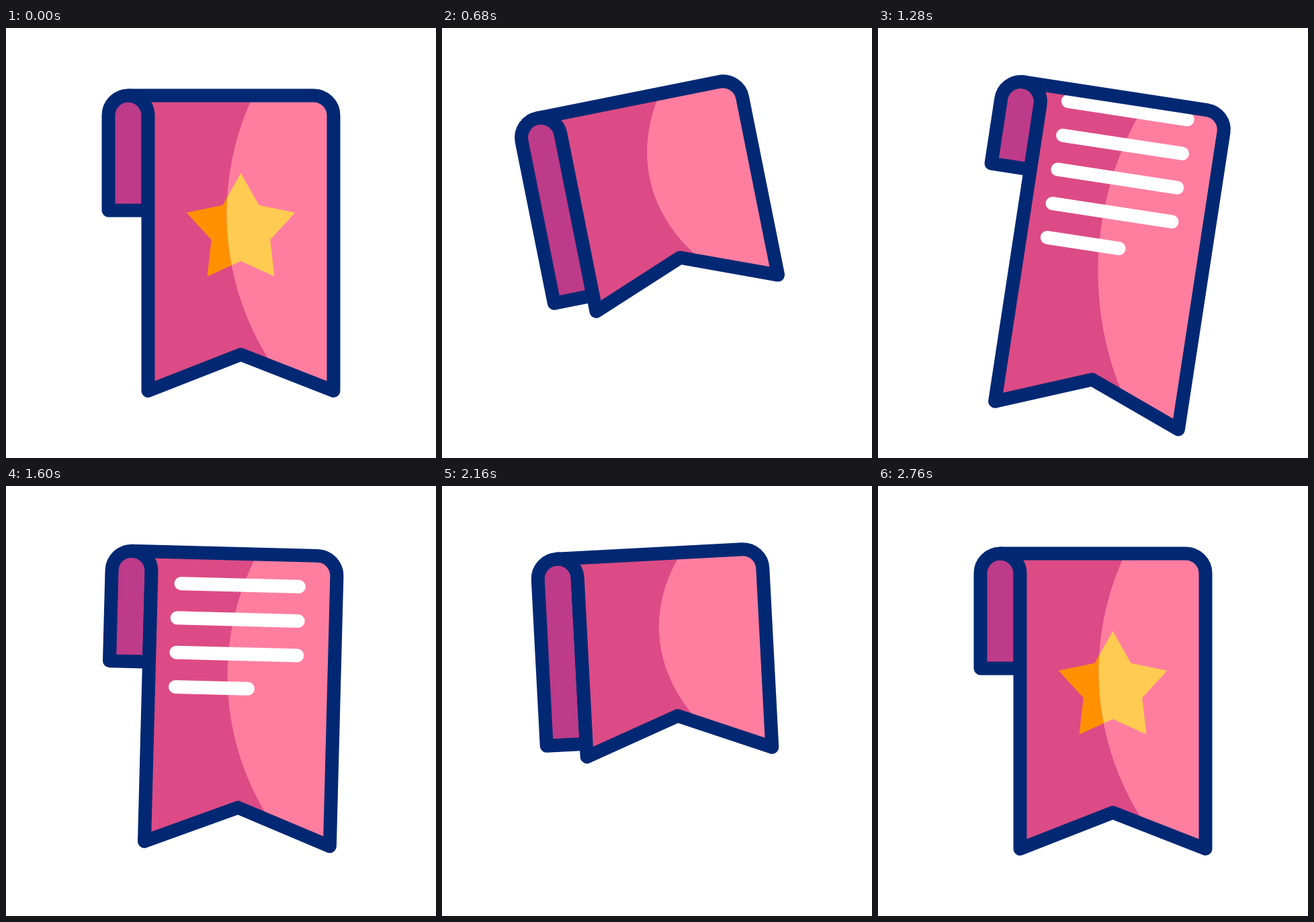
An HTML page with a canvas that plays this animation: 640 px wide and 640 px high, repeating every 3000 ms.

```html
<!DOCTYPE html>
<html lang="en">
<head>
<meta charset="utf-8">
<title>Bookmark</title>
<style>
  html, body { margin: 0; width: 100%; height: 100%; overflow: hidden; background: #fff; }
  canvas { display: block; }
</style>
</head>
<body>
<canvas width="640" height="640"></canvas>
<script>
const ctx = document.querySelector('canvas').getContext('2d');
const LOOP = 3000, STEP = 40, START = 200, BEAT = 560;
const NAVY = '#022873', PINK = '#dc4b85', LIGHT = '#ff7ea0', PURPLE = '#bd3b88',
      ORANGE = '#ff9100', YELLOW = '#ffcb51';

// cubic-bezier(1/3, 0, landing, 1)
function ease(u, landing = 2 / 3) {
  let lo = 0, hi = 1;
  for (let i = 0; i < 24; i++) {
    const s = (lo + hi) / 2, r = 1 - s;
    if (r * r * s + 3 * r * s * s * landing + s ** 3 < u) lo = s; else hi = s;
  }
  return lo * lo * (3 - 2 * lo);
}

// Eased progress from 0 to 1 between two times
function ramp(t, from, to, landing) {
  return ease(Math.min(1, Math.max(0, (t - from) / (to - from))), landing);
}

function poseAt(t) {
  const beat = i => ramp(t, START + BEAT * i, START + BEAT * (i + 1));
  const rollUp = ramp(t, 200, 760, .37);
  const unroll = beat(1);
  const rollBack = ramp(t, 1320, 2160);
  const settle = ramp(t, 2160, 2760, .07);
  const rolled = rollUp - settle, extended = unroll - rollBack;
  return {
    angle: -12 * beat(0) + 21 * beat(1) - 15 * beat(2) + 6 * beat(3),
    body: -143 * rolled + 182.5 * extended,
    flap: 106 * rolled - 152 * extended,
    star: -290 * rollUp - 50 * rollBack + 340 * settle,
    text: 61 + 267 * unroll - 104 * rollBack
  };
}

function fill(path, color) {
  ctx.fillStyle = color;
  ctx.fill(path);
}

function outline(path) {
  ctx.strokeStyle = NAVY;
  ctx.stroke(path);
}

function starPath(cx, cy) {
  const path = new Path2D();
  for (let i = 0; i < 10; i++) {
    const a = i * Math.PI / 5, r = i % 2 ? 46 : 85;
    path.lineTo(cx + r * Math.sin(a), cy - r * Math.cos(a));
  }
  path.closePath();
  return path;
}

// Five lines, wiped away from the left one after another
function drawText(t, bottom) {
  ctx.strokeStyle = '#fff';
  for (let i = 0; i < 5; i++) {
    const start = 1490 + 80 * i, wipe = ramp(t, start, start + 320);
    if (t >= start + 320) continue;
    const left = 251.5, length = i < 4 ? 180 : 108, y = bottom - 51.3 * (4 - i);
    ctx.beginPath();
    ctx.moveTo(left + length * wipe, y);
    ctx.lineTo(left + length, y);
    ctx.stroke();
  }
}

function draw(t) {
  const pose = poseAt(t);
  const tip = 540 + pose.body, stretch = (tip - 100) / 440;

  const flap = new Path2D(`M211.5 ${271.5 + pose.flap}H152.5V130A29.5 29.5 0 0 1 211.5 130Z`);
  const body = new Path2D(`M182 100.5H458A29.5 29.5 0 0 1 487.5 130V${tip}
    L349.5 ${tip - 54}L211.5 ${tip}V130A29.5 29.5 0 0 0 182 100.5Z`);
  const shine = new Path2D();
  shine.ellipse(737.5, 100 + 176 * stretch, 409, 409 * stretch, 0, 0, 2 * Math.PI);
  const star = starPath(349.5, 301 + pose.star);

  ctx.fillStyle = '#fff';
  ctx.fillRect(0, 0, 640, 640);
  ctx.lineWidth = 20;
  ctx.lineCap = ctx.lineJoin = 'round';

  ctx.save();
  ctx.translate(332, 320);
  ctx.rotate(pose.angle * Math.PI / 180);
  ctx.translate(-332, -320);

  fill(flap, PURPLE);
  outline(flap);

  ctx.save();
  ctx.clip(body);
  fill(body, PINK);
  fill(star, ORANGE);
  ctx.save();
  ctx.clip(shine);
  fill(body, LIGHT);
  fill(star, YELLOW);
  ctx.restore();
  if (t > 760) drawText(t, pose.text);
  ctx.restore();

  outline(body);
  ctx.restore();
}

function tick() {
  draw(Math.floor(performance.now() % LOOP / STEP) * STEP);
  requestAnimationFrame(tick);
}
tick();
</script>
</body>
</html>
```
